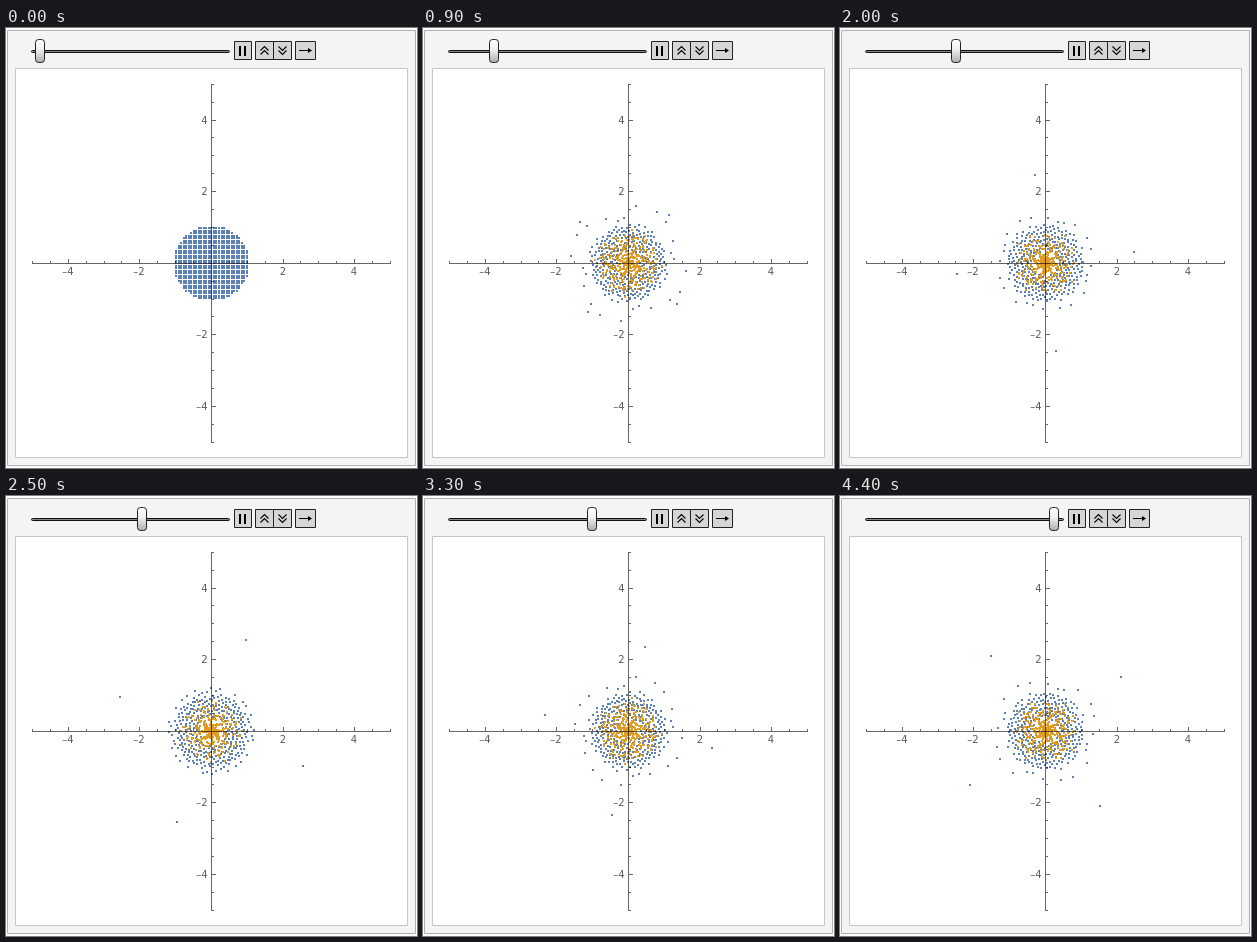
Recreate the animation shown at these times as an HTML page with a canvas. Size 411 by 440 pixels, loop 4500 ms.

```html
<!DOCTYPE html>
<html>
<head>
<meta charset="utf-8">
<style>
html, body { margin: 0; width: 411px; height: 440px; overflow: hidden; background: #fff }
canvas { display: block }
</style>
</head>
<body>
<canvas id="stage" width="411" height="440"></canvas>
<script>
const g = document.getElementById('stage').getContext('2d');
const LOOP = 4500, STEP = 100, CX = 205.48, CY = 235.22, UNIT = 35.8;
const DEG = Math.PI / 180, QUARTER = Math.PI / 2, GOLDEN = 0.618034;
const BLUE = '#5e81b5', ORANGE = '#e19c24', HALO = 7;

function hash(n) {
  const v = Math.sin(n * 127.1 + 3.7) * 43758.5453;
  return v - Math.floor(v);
}

// One quarter of the disc; the rest follows by fourfold symmetry
const seeds = [];
for (let i = 1; i <= 14; i++)
  for (let j = 0; j <= 14; j++)
    if (i * i + j * j <= 221) seeds.push({ r: Math.hypot(i, j) * 0.07, a: Math.atan2(j, i) });
seeds.sort((p, q) => p.r - q.r);
seeds.forEach((p, k) => {
  p.u = (k + 0.5) / seeds.length;
  p.h = hash(k);
  p.core = k % 2 === 0;
  const slot = (k >> 1) * GOLDEN + (p.core ? 0.3 + 0.35 * p.h : 0);
  p.turn = slot % 1 * QUARTER - p.a;
});
const outer = seeds.filter(p => !p.core).slice(-HALO);
const star = outer[0];
outer.forEach(p => p.halo = true);

// The core is tightest when the pulse is 1, the halo widest when it is -1
const pulse = s => Math.cos((s - 25) * 13.85 * DEG);

function radius(p, s) {
  if (p === star) return 2.53 * (1 - Math.exp(-s / 6.5)) + 0.25 * Math.cos((s - 25) * 15 * DEG);
  if (p.core) return 0.85 * p.u ** (1.15 + 0.4 * pulse(s)) * (0.85 + 0.3 * p.h);
  if (p.halo) return 1.2 + 0.55 * p.h * (1 - pulse(s)) / 2;
  const rim = Math.max(0, p.u - 0.78) * 0.9 * p.h;
  return Math.sqrt(0.12 + 1.08 * p.u) + rim + 0.03 * Math.sin(s * 0.3 + p.h * 40);
}

function place(p, s) {
  const w = Math.min(1, s / 7);
  const r = p.r + (radius(p, s) - p.r) * w;
  const a = p === star
    ? p.a + (12.45 * s - 62) * DEG * w - p.a * w
    : p.a + p.turn * w + s * 30 * DEG;
  return [r, a];
}

function dot(x, y) {
  g.fillRect(Math.round(CX + x * UNIT - 1), Math.round(CY - y * UNIT - 1), 2, 2);
}

function drawDots(s) {
  for (const core of [false, true])
    for (const p of seeds) {
      if (p.core !== core) continue;
      const [r, a] = place(p, s);
      g.fillStyle = core && s > 1 + 7 * p.u ? ORANGE : BLUE;
      for (let q = 0; q < 4; q++)
        dot(r * Math.cos(a + q * QUARTER), r * Math.sin(a + q * QUARTER));
    }
  g.fillStyle = s > 1 ? ORANGE : BLUE;
  dot(0, 0);
}

function line(color, width, ...pts) {
  g.strokeStyle = color;
  g.lineWidth = width;
  g.beginPath();
  for (let i = 0; i < pts.length; i += 2) g.lineTo(pts[i], pts[i + 1]);
  g.stroke();
}

function box(x, y, w, h, fill, stroke, corner = 0) {
  g.beginPath();
  g.roundRect(x + 0.5, y + 0.5, w - 1, h - 1, corner);
  g.fillStyle = fill;
  g.fill();
  g.lineWidth = 1;
  g.strokeStyle = stroke;
  g.stroke();
}

function drawAxes() {
  const ink = 'rgba(0,0,0,.6)';
  line(ink, 1, 26, 235.5, 385, 235.5);
  line(ink, 1, 205.5, 56, 205.5, 415);
  g.font = '10px "DejaVu Sans", sans-serif';
  g.textBaseline = 'middle';
  g.fillStyle = '#5c5c5c';
  for (let n = -10; n <= 10; n++) {
    if (!n) continue;
    const major = n % 4 === 0, len = major ? 4 : 2;
    const x = Math.floor(CX + n * UNIT / 2) + 0.5;
    const y = Math.floor(CY - n * UNIT / 2) + 0.5;
    line(ink, 1, x, 235, x, 235 - len);
    line(ink, 1, 206, y, 206 + len, y);
    if (!major) continue;
    const label = (n < 0 ? '–' : '') + Math.abs(n / 2);
    g.textAlign = 'center';
    g.fillText(label, x - 0.5, 244.5);
    g.textAlign = 'right';
    g.fillText(label, 201.5, y + 0.5);
  }
}

function drawControls(s) {
  box(25, 22, 199, 3, '#888', '#111', 1);
  const x = Math.round(29 + s * 4.09);
  const shade = g.createLinearGradient(0, 11, 0, 35);
  shade.addColorStop(0, '#fff');
  shade.addColorStop(0.45, '#eee');
  shade.addColorStop(1, '#aaa');
  box(x, 11, 10, 24, shade, '#222', 3);

  for (const [left, w] of [[228, 18], [249, 19], [267, 19], [289, 21]])
    box(left, 13, w, 19, '#d6d6d6', '#222');
  g.fillStyle = '#000';
  g.fillRect(233, 18, 2, 10);
  g.fillRect(238, 18, 2, 10);
  for (const y of [18.5, 22.5]) {
    line('#000', 1.1, 254.5, y + 4, 258.5, y, 262.5, y + 4);
    line('#000', 1.1, 272.5, y, 276.5, y + 4, 280.5, y);
  }
  line('#000', 1, 293, 22.5, 304, 22.5);
  g.beginPath();
  g.moveTo(306, 22.5);
  g.lineTo(302, 20);
  g.lineTo(302, 25);
  g.fill();
}

function draw(now) {
  const s = Math.floor(now % LOOP / STEP);
  g.fillStyle = '#fff';
  g.fillRect(0, 0, 411, 440);
  box(1, 2, 409, 436, '#f4f4f4', '#b0b0b0');
  box(9, 40, 393, 390, '#fff', '#c6c6c6');
  drawDots(s);
  drawAxes();
  drawControls(s);
}

const start = performance.now();
function tick() {
  draw(performance.now() - start);
  requestAnimationFrame(tick);
}
tick();
</script>
</body>
</html>
```
